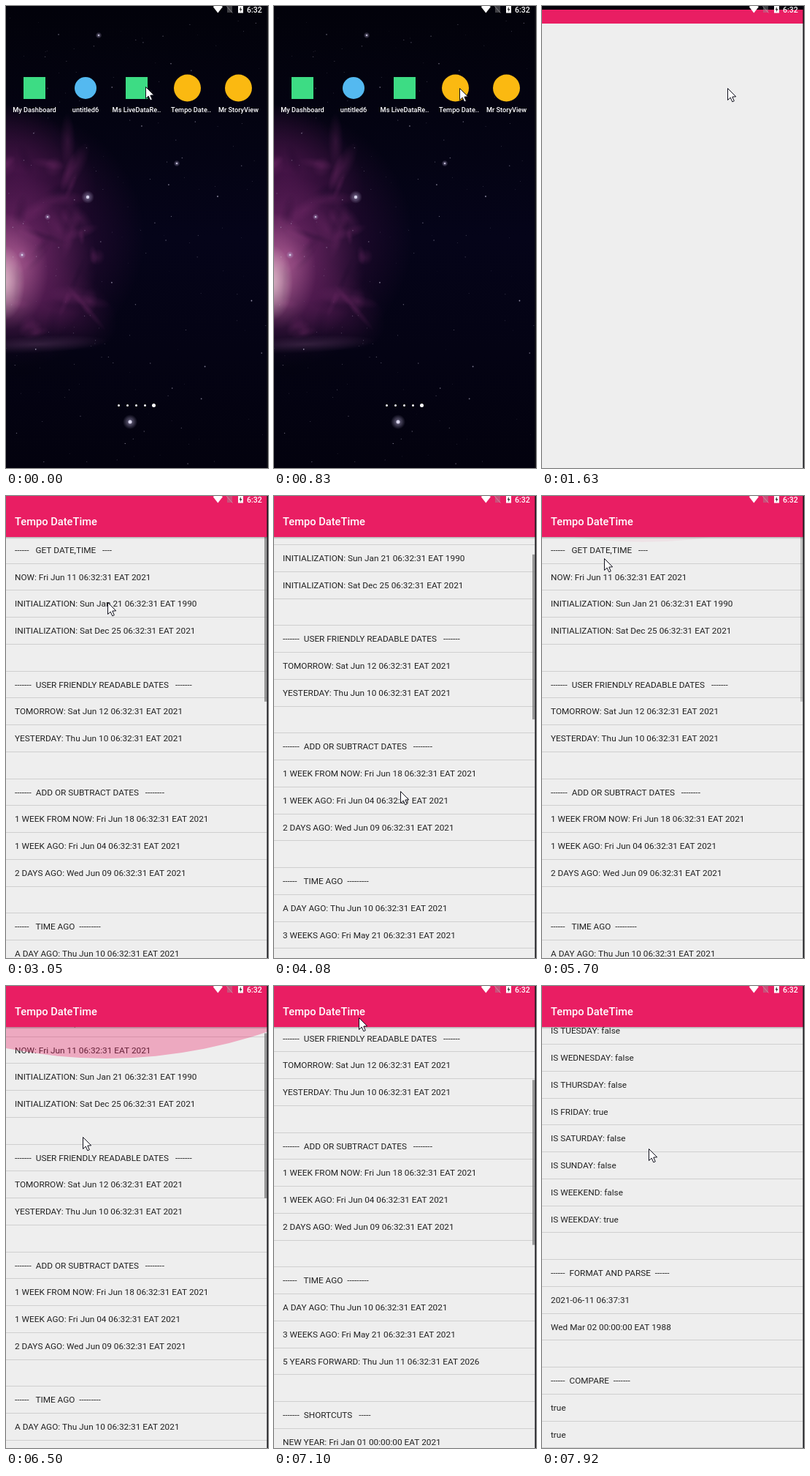
Write an HTML page with a canvas that moves like this. It is 359 px wide and 631 px high and loops after 8 s.

```html
<!DOCTYPE html>
<html lang="en">
<head>
<meta charset="utf-8">
<title>Date list demo</title>
<style>
html, body { margin: 0; width: 100%; height: 100%; overflow: hidden; background: #000; }
canvas { display: block; }
</style>
</head>
<body>
<canvas id="stage" width="359" height="631"></canvas>
<script>
const W = 359, H = 631, EDGE = 357.5, LOOP = 8000, STEP = 203;
const BAR = 56, LIST_TOP = 55.5, ROW = 36.75, TEXT_SCALE = 0.815;
const PINK = '#e91e63';
const ctx = document.getElementById('stage').getContext('2d');

const stamp = (day, year = 2021, time = '06:32:31') => `${day} ${time} EAT ${year}`;
const midnight = (day, year) => stamp(day, year, '00:00:00');
const heading = (before, text, after) => '-'.repeat(before) + text + '-'.repeat(after);
const weekdays = ['MONDAY', 'TUESDAY', 'WEDNESDAY', 'THURSDAY', 'FRIDAY', 'SATURDAY', 'SUNDAY'];

const rows = [
  heading(6, '   GET DATE,TIME   ', 4),
  'NOW: ' + stamp('Fri Jun 11'),
  'INITIALIZATION: ' + stamp('Sun Jan 21', 1990),
  'INITIALIZATION: ' + stamp('Sat Dec 25'),
  '',
  heading(7, '  USER FRIENDLY READABLE DATES   ', 7),
  'TOMORROW: ' + stamp('Sat Jun 12'),
  'YESTERDAY: ' + stamp('Thu Jun 10'),
  '',
  heading(7, '  ADD OR SUBTRACT DATES   ', 8),
  '1 WEEK FROM NOW: ' + stamp('Fri Jun 18'),
  '1 WEEK AGO: ' + stamp('Fri Jun 04'),
  '2 DAYS AGO: ' + stamp('Wed Jun 09'),
  '',
  heading(6, '   TIME AGO  ', 9),
  'A DAY AGO: ' + stamp('Thu Jun 10'),
  '3 WEEKS AGO: ' + stamp('Fri May 21'),
  '5 YEARS FORWARD: ' + stamp('Thu Jun 11', 2026),
  '',
  heading(7, '  SHORTCUTS   ', 5),
  'NEW YEAR: ' + midnight('Fri Jan 01', 2021),
  'CHRISTMAS: ' + midnight('Sat Dec 25', 2021),
  'IS TODAY: true',
  ...weekdays.map(day => `IS ${day}: ${day === 'FRIDAY'}`),
  'IS WEEKEND: false',
  'IS WEEKDAY: true',
  '',
  heading(6, '  FORMAT AND PARSE  ', 6),
  '2021-06-11 06:37:31',
  midnight('Wed Mar 02', 1988),
  '',
  heading(6, '  COMPARE  ', 7),
  'true',
  'true'
];
const VIEW = H - LIST_TOP, CONTENT = rows.length * ROW, END = CONTENT - VIEW;

// Turning points of the pointer: [step, x, y]
const path = [
  [0, 191, 110], [2, 230, 78], [4, 254, 112], [13, 254, 112], [15, 139, 145],
  [18, 172, 472], [19, 172, 472], [22, 174, 266], [24, 170, 287], [26, 150, 480],
  [28, 85, 85], [29, 85, 85], [31, 104, 229], [32, 105, 206], [34, 116, 43], [39, 146, 222]
];

const clamp = (v, lo = 0, hi = 1) => Math.min(hi, Math.max(lo, v));
const mix = (a, b, k) => a + (b - a) * k;

function pointerAt(step) {
  const next = path.findIndex(([s]) => s > step);
  if (next < 0) return path[path.length - 1].slice(1);
  const [s0, x0, y0] = path[next - 1], [s1, x1, y1] = path[next];
  const k = (step - s0) / (s1 - s0);
  return [mix(x0, x1, k), mix(y0, y1, k)];
}

// The list follows the pointer while dragged, then is flung to its end
function scrollAt(step) {
  const y = pointerAt(step)[1];
  if (step < 19) return 0;
  if (step < 26) return Math.max(0, 465.5 - y);
  if (step < 31) return 0;
  if (step <= 34) return 229 - y;
  return mix(186, END, Math.sin(clamp((step - 34) / 2) * Math.PI / 2));
}

function scrollbarAlpha(step) {
  const rests = [[17, 20], [29, 30], [39, 40]];
  const [gone] = rests.find(([, wake]) => step < wake);
  return clamp((gone - step) / 2);
}

function glowDepth(step, offset) {
  const pulse = (mid, half, size) => size * Math.max(0, 1 - ((step - mid) / half) ** 2);
  return offset > 100 ? 0 : pulse(26, 2.4, 24) + pulse(31.5, 2.5, 45.3);
}

function seeded(seed) {
  return () => (seed = (seed * 16807) % 2147483647) / 2147483647;
}

function rect(g, x, y, w, h, fill) {
  g.fillStyle = fill;
  g.fillRect(x, y, w, h);
}

function disc(g, x, y, r, fill) {
  g.fillStyle = fill;
  g.beginPath();
  g.arc(x, y, r, 0, Math.PI * 2);
  g.fill();
}

function polygon(g, points, fill) {
  g.fillStyle = fill;
  g.beginPath();
  points.forEach(([x, y]) => g.lineTo(x, y));
  g.closePath();
  g.fill();
}

function label(g, text, x, y, size, weight, fill, align = 'left') {
  g.save();
  g.translate(x, y);
  g.scale(TEXT_SCALE, TEXT_SCALE);
  g.font = `${weight} ${size}px Roboto, sans-serif`;
  g.textAlign = align;
  g.fillStyle = fill;
  g.fillText(text, 0, 0);
  g.restore();
}

// Soft elliptical cloud
function haze(g, x, y, rx, ry, rgb, alpha, tilt = 0) {
  const fade = g.createRadialGradient(0, 0, 0, 0, 0, 1);
  fade.addColorStop(0, `rgba(${rgb},${alpha})`);
  fade.addColorStop(0.5, `rgba(${rgb},${alpha * 0.5})`);
  fade.addColorStop(1, `rgba(${rgb},0)`);
  g.save();
  g.translate(x, y);
  g.rotate(tilt);
  g.scale(rx, ry);
  disc(g, 0, 0, 1, fade);
  g.restore();
}

function drawSky(g) {
  const rnd = seeded(77);
  const sky = g.createLinearGradient(0, 0, 0, H);
  sky.addColorStop(0, '#02020a');
  sky.addColorStop(0.5, '#050419');
  sky.addColorStop(1, '#03020e');
  rect(g, 0, 0, W, H, sky);

  haze(g, 0, 315, 190, 180, '74,18,76', 0.8);
  haze(g, 15, 225, 115, 85, '92,26,88', 0.6, 0.5);
  haze(g, 10, 350, 115, 120, '142,54,124', 0.75);
  haze(g, 65, 405, 95, 55, '92,28,88', 0.5, 0.5);
  for (let i = 0; i < 50; i++) {
    haze(g, rnd() * 125, 180 + rnd() * 270, 10 + rnd() * 32, 4 + rnd() * 10,
      rnd() < 0.5 ? '138,52,122' : '20,6,36', 0.24, rnd() * 3);
  }
  haze(g, 0, 362, 58, 80, '200,125,168', 0.7);
  haze(g, -4, 378, 30, 52, '232,205,212', 0.8);
  haze(g, 45, 462, 95, 12, '82,52,88', 0.55, -0.05);
  haze(g, 20, 500, 120, 38, '4,3,16', 0.7);

  for (let i = 0; i < 180; i++) {
    const r = 0.3 + rnd() * rnd() * 0.8;
    disc(g, rnd() * EDGE, 15 + rnd() * (H - 20), r, `rgba(205,200,225,${0.2 + rnd() * 0.55})`);
  }
  const bright = [[112, 261, 2.2], [170, 568, 2.5], [22, 340, 1.3], [234, 215, 1.1], [57, 288, 1.1], [127, 40, 1.1]];
  for (const [x, y, r] of bright) {
    haze(g, x, y, r * 4, r * 4, '190,180,220', 0.6);
    disc(g, x, y, r, '#d6d3ea');
  }
}

function makeHome() {
  const home = document.createElement('canvas');
  home.width = W;
  home.height = H;
  const g = home.getContext('2d');
  drawSky(g);
  const square = x => rect(g, x - 15, 97, 30, 30, '#3ddc84');
  const yellow = x => disc(g, x, 112, 18.5, '#fbb911');
  const apps = [
    ['My Dashboard', 39, square],
    ['untitled6', 109, x => disc(g, x, 112, 15, '#54b9f0')],
    ['Ms LiveDataRe..', 179, square],
    ['Tempo Date..', 253.5, x => yellow(x - 5)],
    ['Mr StoryView', 318.5, yellow]
  ];
  for (const [name, x, icon] of apps) {
    icon(x);
    label(g, name, x, 145, 11.3, 500, '#fff', 'center');
  }
  for (let i = 0; i < 5; i++) disc(g, 154.5 + i * 12, 545.5, i === 4 ? 2.5 : 1.5, '#fff');
  return home;
}

function drawStatus() {
  ctx.fillStyle = '#fff';
  ctx.beginPath();
  ctx.moveTo(290.3, 9.5);
  ctx.lineTo(283.7, 1);
  ctx.quadraticCurveTo(290.3, -3.5, 297, 1);
  ctx.fill();

  ctx.globalAlpha = 0.4;
  rect(ctx, 303, 0, 7, 9, '#9a9a9a');
  ctx.strokeStyle = '#ddd';
  ctx.lineWidth = 1;
  ctx.beginPath();
  ctx.moveTo(302, 0);
  ctx.lineTo(310.5, 9.5);
  ctx.stroke();
  ctx.globalAlpha = 1;

  rect(ctx, 318, 0, 7, 9.5, '#fff');
  polygon(ctx, [[322, 1], [319.6, 5.2], [321.2, 5.2], [321, 8.3], [323.4, 4], [321.8, 4]], '#333');
  label(ctx, '6:32', 330, 8.8, 13, 500, '#fff');
}

function drawList(step) {
  const offset = scrollAt(step);
  rows.forEach((text, i) => {
    const y = LIST_TOP + i * ROW - offset;
    if (y < LIST_TOP - ROW || y > H) return;
    label(ctx, text, 12, Math.round(y + 22.4), 14.5, 400, '#212121');
    rect(ctx, 0, Math.round(y + ROW - 0.7), EDGE, 1, '#cfcfcf');
  });
  rect(ctx, 354, LIST_TOP + offset * VIEW / CONTENT, 3.5, VIEW * VIEW / CONTENT,
    `rgba(125,125,125,${scrollbarAlpha(step) * 0.75})`);

  const depth = glowDepth(step, offset);
  if (depth) disc(ctx, 138, LIST_TOP + depth - 684, 684, `rgba(233,30,99,${depth / 130})`);

  const shade = ctx.createLinearGradient(0, BAR, 0, BAR + 3);
  shade.addColorStop(0, 'rgba(0,0,0,.25)');
  shade.addColorStop(1, 'rgba(0,0,0,0)');
  rect(ctx, 0, BAR, EDGE, 3, shade);
  rect(ctx, 0, 0, W, BAR, PINK);
  label(ctx, 'Tempo DateTime', 12, 40, 18, 500, '#fff');
}

function drawPointer(step) {
  const [x, y] = pointerAt(step).map(Math.round);
  ctx.save();
  ctx.translate(x + 0.5, y + 0.5);
  polygon(ctx, [[0, 0], [0, 16], [3.7, 12.6], [6.3, 18.3], [8.8, 17.2], [6.3, 11.6], [11.2, 11.3]], '#fff');
  ctx.strokeStyle = '#10101c';
  ctx.lineWidth = 1;
  ctx.stroke();
  ctx.restore();
}

const home = makeHome();

function draw(t) {
  const step = Math.floor(t / STEP);
  if (step < 8) {
    ctx.drawImage(home, 0, 0);
  } else {
    rect(ctx, 0, 0, W, H, '#eeeeee');
    if (step < 9) {
      rect(ctx, 0, 0, W, 5, '#03030c');
      rect(ctx, 0, 5, W, 19, PINK);
    } else if (step < 11) {
      rect(ctx, 0, 0, W, 13.5, PINK);
    } else {
      drawList(step);
    }
  }
  drawStatus();
  drawPointer(step);
  rect(ctx, EDGE, 0, W - EDGE, H, '#16161a');
}

const start = performance.now();
function tick() {
  draw((performance.now() - start) % LOOP);
  requestAnimationFrame(tick);
}
tick();
</script>
</body>
</html>
```
